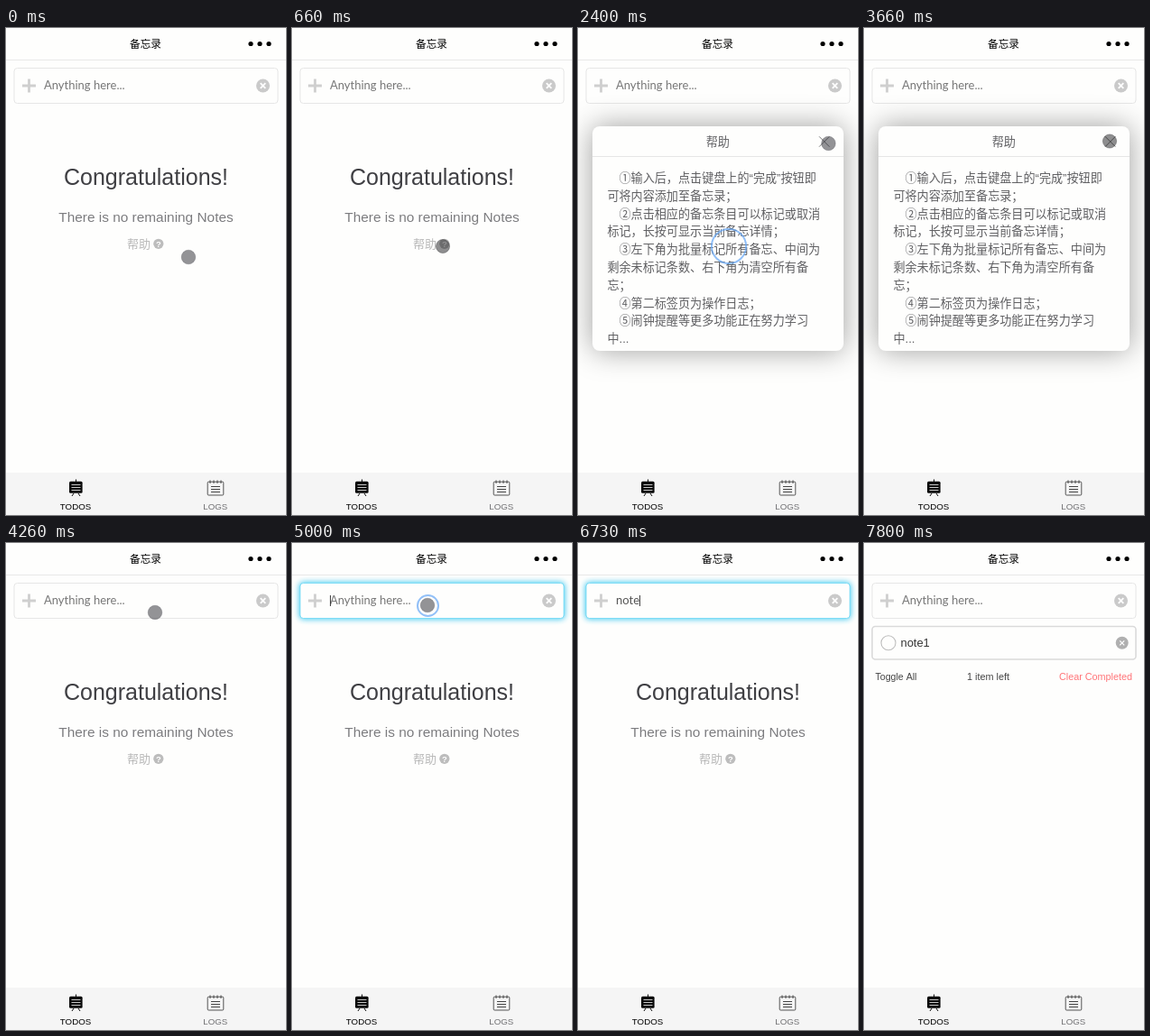
Recreate the animation shown at these times as an HTML page with a canvas. Size 310 by 540 pixels, loop 8000 ms.

```html
<!DOCTYPE html>
<html lang="zh-CN">
<head>
<meta charset="utf-8">
<title>备忘录</title>
<style>
html, body { margin: 0; width: 100%; height: 100%; overflow: hidden; background: #fefefd; }
canvas { display: block; width: 310px; height: 540px; }
</style>
</head>
<body>
<canvas id="stage"></canvas>
<script>
const LOOP = 8000;
const canvas = document.getElementById('stage');
const ctx = canvas.getContext('2d');
const dpr = window.devicePixelRatio || 1;
canvas.width = 310 * dpr;
canvas.height = 540 * dpr;

const SANS = '"Liberation Sans", "Noto Sans CJK SC", sans-serif';
const CJK = '"Noto Sans CJK SC", sans-serif';
const INPUT = 'Lato, sans-serif';
const PAPER = '#fefefd';

const HELP = [
  ' ①输入后，点击键盘上的“完成”按钮即', '可将内容添加至备忘录；',
  ' ②点击相应的备忘条目可以标记或取消', '标记，长按可显示当前备忘详情；',
  ' ③左下角为批量标记所有备忘、中间为', '剩余未标记条数、右下角为清空所有备', '忘；',
  ' ④第二标签页为操作日志；', ' ⑤闹钟提醒等更多功能正在努力学习', '中...'
];

// Pointer path: [time, x, y]
const PATH = [
  [400, 202, 254], [660, 167, 242], [1800, 167, 242], [2350, 277.5, 128],
  [2930, 270, 126], [3530, 270, 126], [3660, 272, 125.5], [4080, 272, 125.5],
  [4260, 165, 77], [4450, 150, 69]
];
const PRESSES = [[650, 1530], [3650, 3930], [4450, 4600]];
const RINGS = [[1430, 167, 242], [4560, 150.5, 69.5]];
const RING_LIFE = 1170;
const TYPED = [[5500, 'n'], [6530, 'no'], [6600, 'not'], [6730, 'note'], [7330, 'note1']];
const CARET_ON = [[4600, 5100], [5500, 6000], [6530, 7260], [7330, 7600]];
const FOCUS = 4600, TYPING = 5500, SUBMIT = 7800;

const within = (t, spans) => spans.some(([a, b]) => t >= a && t < b);

function text(str, x, y, size, color, align = 'left', family = SANS, weight = 400) {
  ctx.font = `${weight} ${size}px ${family}`;
  ctx.textAlign = align;
  ctx.fillStyle = color;
  ctx.fillText(str, x, y);
}

function line(color, width, ...points) {
  ctx.strokeStyle = color;
  ctx.lineWidth = width;
  ctx.beginPath();
  for (const [x1, y1, x2, y2] of points) {
    ctx.moveTo(x1, y1);
    ctx.lineTo(x2, y2);
  }
  ctx.stroke();
}

function disc(x, y, r, fill, stroke, width = 1) {
  ctx.beginPath();
  ctx.arc(x, y, r, 0, Math.PI * 2);
  if (fill) { ctx.fillStyle = fill; ctx.fill(); }
  if (stroke) { ctx.strokeStyle = stroke; ctx.lineWidth = width; ctx.stroke(); }
}

function box(x, y, w, h, r, fill, stroke, width = 1) {
  ctx.beginPath();
  ctx.roundRect(x, y, w, h, r);
  if (fill) { ctx.fillStyle = fill; ctx.fill(); }
  if (stroke) { ctx.strokeStyle = stroke; ctx.lineWidth = width; ctx.stroke(); }
}

function cross(x, y, r, color, width) {
  line(color, width, [x - r, y - r, x + r, y + r], [x + r, y - r, x - r, y + r]);
}

function shadowed(color, blur, draw) {
  ctx.save();
  ctx.shadowColor = color;
  ctx.shadowBlur = blur * dpr;
  draw();
  ctx.restore();
}

function drawChrome() {
  ctx.fillStyle = PAPER;
  ctx.fillRect(0, 0, 310, 540);
  text('备忘录', 154.5, 21.5, 11.6, '#000', 'center', CJK, 500);
  for (const x of [271, 281, 291]) disc(x, 17.5, 2.6, '#000');
  line('#e8e8e8', 1, [0, 35.5, 310, 35.5]);

  ctx.fillStyle = '#f5f5f5';
  ctx.fillRect(0, 493, 310, 47);
  text('TODOS', 77, 534.3, 9.7, '#000', 'center');
  text('LOGS', 231.7, 534.3, 9.7, '#707073', 'center');

  line('#111', 1, [77.5, 500.5, 77.5, 503], [75, 516, 73, 519], [80, 516, 82, 519]);
  box(70, 502.8, 14.6, 13, 1.5, '#0a0a0a');
  line('#ddd', 0.9, [72.5, 506.5, 82.5, 506.5], [72.5, 509.5, 82.5, 509.5], [72.5, 512.5, 82.5, 512.5]);

  box(223.2, 503.2, 17.6, 14.8, 1, null, '#555', 1);
  for (let x = 226; x <= 238; x += 4) line('#444', 1, [x, 501.5, x, 505]);
  line('#444', 1, [227, 508.5, 237, 508.5], [227, 511.5, 237, 511.5], [227, 514.5, 237, 514.5]);
}

function drawInput(t) {
  const focused = t >= FOCUS && t < SUBMIT;
  const frame = color => box(9, 44.5, 292, 39, 3.5, PAPER, color, 1);
  if (focused) {
    shadowed('rgba(20,190,240,.9)', 6, () => frame('#72d9f5'));
    frame('#7edcf5');
  } else {
    frame('#e6e6e6');
  }
  line('#cfcfcf', 2.8, [18, 64, 33, 64], [25.5, 56.5, 25.5, 71.5]);
  disc(284.5, 64, 7.5, '#cacaca');
  cross(284.5, 64, 2.8, '#fff', 1.8);

  const typing = t >= TYPING && t < SUBMIT;
  let value = '';
  if (typing) {
    for (const [at, str] of TYPED) if (t >= at) value = str;
    text(value, 42, 68, 13, '#555', 'left', INPUT);
  } else {
    text('Anything here...', 42, 68, 13, '#777', 'left', INPUT);
  }
  if (within(t, CARET_ON)) {
    ctx.font = `400 13px ${INPUT}`;
    const x = 42.5 + ctx.measureText(value).width;
    line('#444', 1, [x, 58, x, 70]);
  }
}

function drawEmpty() {
  text('Congratulations!', 155, 174, 25, '#3f3f43', 'center');
  text('There is no remaining Notes', 155, 215, 15.4, '#7c7c7f', 'center');
  text('帮助', 134, 244, 13, '#b8b8b8', 'left', CJK);
  disc(168.8, 239.3, 5.6, '#bdbdbd');
  text('?', 168.8, 242.8, 9.5, '#fff', 'center', SANS, 700);
}

function drawList() {
  box(9, 92.5, 292, 36.5, 3.5, PAPER, '#dadada', 1.6);
  disc(27, 110.7, 8, null, '#bdbdbd', 1.1);
  text('note1', 40.5, 115, 12.9, '#333');
  disc(285.7, 110.8, 7, '#b0b0b0');
  cross(285.7, 110.8, 2.5, '#fff', 1.2);
  text('Toggle All', 12.5, 151.5, 10.6, '#444');
  text('1 item left', 137.5, 151.5, 10.8, '#444', 'center');
  text('Clear Completed', 297, 151.5, 10.8, '#ff7478', 'right');
}

function drawHelp() {
  shadowed('rgba(0,0,0,.38)', 32, () => box(16, 109, 278, 249, 8, PAPER));
  text('帮助', 154.8, 131, 13.1, '#636366', 'center', CJK);
  cross(272.7, 126, 5.7, '#777', 1);
  line('#e6e6e6', 1, [16, 142.5, 294, 142.5]);
  HELP.forEach((row, i) => {
    const indent = row[0] === ' ' ? 13.1 : 0;
    text(row.trim(), 32.4 + indent, 171 + i * 19.8, 13.1, '#5e5e61');
  });
}

function pointerAt(t) {
  const next = PATH.findIndex(key => key[0] > t);
  if (next === 0) return PATH[0].slice(1);
  if (next < 0) return PATH[PATH.length - 1].slice(1);
  const [t0, x0, y0] = PATH[next - 1], [t1, x1, y1] = PATH[next];
  const p = (t - t0) / (t1 - t0), e = p * p * (3 - 2 * p);
  return [x0 + (x1 - x0) * e, y0 + (y1 - y0) * e];
}

function drawPointer(t) {
  for (const [start, x, y] of RINGS) {
    const p = (t - start) / RING_LIFE;
    if (p > 0 && p < 1) disc(x, y, Math.max(0.5, 22.5 * p ** 0.6 - 1), null, 'rgba(100,165,245,.7)', 2);
  }
  if (t >= TYPING) return;
  const [x, y] = pointerAt(t);
  if (within(t, PRESSES)) disc(x, y, 7.6, 'rgba(20,20,24,.48)', 'rgba(40,40,44,.35)');
  else disc(x, y, 7.8, 'rgba(40,40,48,.5)', 'rgba(80,80,88,.3)');
}

function draw(t) {
  ctx.setTransform(dpr, 0, 0, dpr, 0, 0);
  drawChrome();
  drawInput(t);
  if (t < SUBMIT) drawEmpty();
  else drawList();
  if (t >= 1400 && t < 3930) drawHelp();
  if (t >= 1400 && t < 1530) {
    ctx.fillStyle = 'rgba(51,181,229,.4)';
    ctx.fillRect(134, 232, 43, 18);
  }
  drawPointer(t);
}

const begin = performance.now();
function tick() {
  draw((performance.now() - begin) % LOOP);
  requestAnimationFrame(tick);
}
tick();
</script>
</body>
</html>
```
